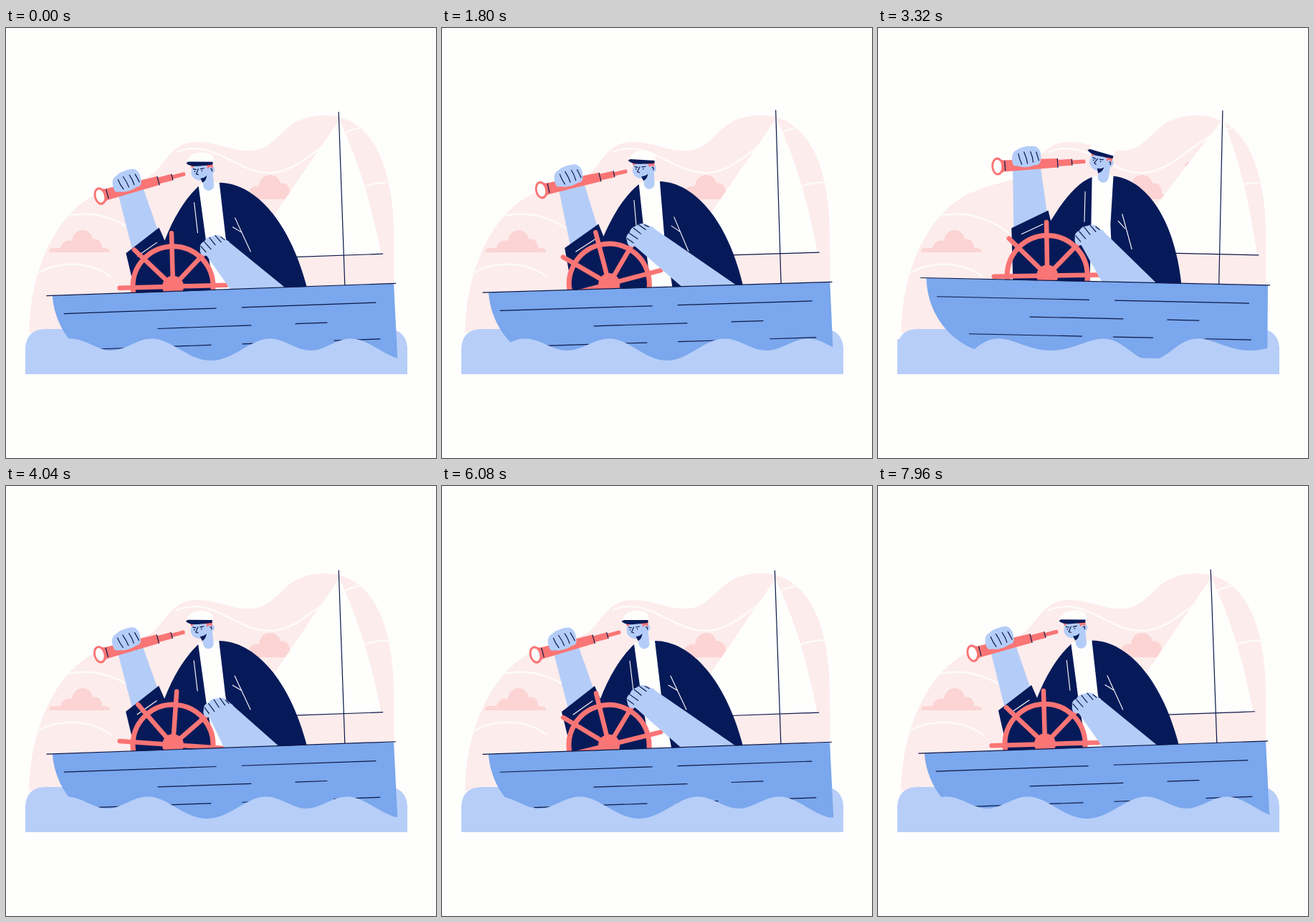
Animation, 600 px wide and 600 px high, one loop 8000 ms. Source, as an HTML page:

```html
<!DOCTYPE html>
<html lang="en">
<head>
<meta charset="utf-8">
<title>Captain at the wheel</title>
<style>
  html, body { margin: 0; width: 100%; height: 100%; overflow: hidden; background: #fefefd; }
  svg { display: block; width: 100vw; height: 100vh; }
  .white { fill: #fefefd; }
  .navy { fill: #061a59; }
  .skin { fill: #b4cdf8; }
  .red { fill: #fa7575; }
  .sky { fill: #fdecec; }
  .cloud { fill: #fcd4d4; }
  .water { fill: #b7cef8; }
  .hull { fill: #7aa7ed; }
  .ink, .chalk, .wind { fill: none; stroke-linecap: round; stroke-linejoin: round; }
  .ink { stroke: #0b1747; stroke-width: 1.2; }
  .chalk { stroke: #fefefd; stroke-width: 1.1; }
  .wind { stroke: #fefafa; stroke-width: 2.6; }
  .rim { fill: none; stroke: #fa7575; stroke-width: 7; stroke-linecap: round; }
</style>
</head>
<body>
<svg viewBox="0 0 600 600">
  <path class="sky" d="M32 425C34 330 75 250 135 228C165 214 190 216 208 201C226 184 232 159 268 159C302 160 320 176 350 170C385 162 387 122 445 122C515 122 541 200 541 290L542 425Z"/>
  <g class="wind">
    <path d="M41 344C70 325 115 324 146 347"/>
    <path d="M87 262C125 253 168 268 196 300"/>
    <path d="M238 173C290 152 322 205 372 202C418 198 440 152 494 139"/>
    <path d="M496 222Q518 215 539 215"/>
  </g>
  <g class="cloud">
    <path d="M60 313Q60 307 66 307H76C78 299 85 295 92 297C95 277 118 278 121 295C129 293 134 299 134 307H139Q145 308 145 313Z"/>
    <path d="M326 239Q327 232 334 232H338C339 223 346 219 353 221C355 200 380 201 383 217C391 215 396 221 396 231Q402 233 402 239Z"/>
    <path d="M428 193Q429 187 436 186C440 178 446 176 450 177C456 164 472 168 473 180C480 178 485 182 486 187Q490 188 490 193Z"/>
  </g>
  <path class="water" d="M27 483V446Q29 421 54 420H533Q558 421 560 446V483Z"/>

  <g class="boat">
    <path class="white" d="M474 131Q432 187 392 242L335 318H527Q510 210 476 131Z"/>
    <path class="ink" d="M474.7 118V360M405 318H529"/>
  </g>

  <path id="forearm" class="skin"/>
  <path id="shirt" class="white"/>
  <path id="coatL" class="navy"/>
  <path id="coatR" class="navy"/>
  <path id="seams" class="chalk"/>

  <g id="head">
    <path class="skin" d="M-13-8L-14 3C-13 10-6 14 2 13L3 20C4 29 17 30 18 20L15-8Z"/>
    <ellipse class="skin" cx="15" cy="-2" rx="4" ry="5"/>
    <path class="red" d="M-15-8H-8L-13-4ZM-2-9L16-10V-4L12-6L9-3L8-7Z"/>
    <path class="white" d="M-20-11C-19-24-4-27 4-26C15-25 19-20 16-11Z"/>
    <path class="navy" d="M-21-11L-18-13L16-13V-9L-4-7Q-16-6-21-11Z"/>
    <path class="navy" d="M-1 10Q4 10 8 6Q7 14 2 16Z"/>
    <path class="ink" d="M-11-3L-7-2M-1-3L4-4M-9 0V1M1-1V0M-4-3L-7 4L-4 5M13-3Q16-4 15 0"/>
  </g>

  <g id="scope">
    <path class="red" d="M0-11L9-8L84-6.5V6L9 8L0 11ZM84-4.5H104V4.5H84ZM104-2.7H122Q124 0 122 2.7H104Z"/>
    <ellipse class="red" rx="8.5" ry="12.5"/>
    <ellipse class="white" rx="5.6" ry="9.3"/>
    <path class="ink" d="M10.5-7V6M84-6V6M104-4V4"/>
    <path class="skin" d="M21-5C20-14 23-21 30-22C34-26 52-27 56-24C61-20 62-14 61-9C61-2 58 2 52 1C45 4 34 4 28 1C23 1 21-1 21-5Z"/>
    <path class="ink" d="M30-16Q31-8 34-1M38-18Q41-10 42-2M47-18Q50-10 50-3M55-17Q57-10 58-5"/>
  </g>

  <g class="boat">
    <g id="wheel">
      <circle class="rim" r="56"/>
      <g id="spokes"></g>
      <circle class="red" r="15"/>
    </g>
  </g>

  <path id="arm" class="skin"/>
  <g id="hand">
    <path class="skin" d="M290 325L280 318C272 319 270 313 271 308C270 303 273 299 277 298C279 293 284 291 288 291C293 288 300 289 303 293L311 298L314 310Z"/>
    <path class="ink" d="M272 305L279 313M277 299L286 309M284 293L292 303M292 290L300 299M300 292L305 296"/>
  </g>

  <g class="boat">
    <path class="hull" d="M66.5 360C68 410 105 462 172 465H544.5L543 360Z"/>
    <path class="ink" d="M58.5 359.7H545.7M82 385.5H294M330 385.5H517M212 411H342M404 411H448M128 436.5H285M329 436.5H384M457 436.5H521"/>
  </g>
  <path id="wave" class="water"/>
</svg>

<script>
const LOOP = 8000;
const HUB = [235, 353];
const PIVOT = [302, 410];
const DECK = 359.7;
const SWELL = 278;

// Each shape of the sailor: leaning back, leaning forward.
const POSES = {
  forearm: ["M153 222L187 214L214 290L178 318Z",
            "M193 182L231 180L240 260L191 282Z"],
  shirt: ["M268 219L298 215L307 300L335 385L285 385L275 290Z",
          "M303 205L334 204L328 290L335 385L285 385L299 280Z"],
  coatL: ["M268 221C248 240 232 268 221 297L213 279L167 315L184 385L294 385L279 300Z",
          "M303 206C278 214 258 244 244 265L241 251L189 274L190 385L295 385L300 275Z"],
  coatR: ["M297 216C345 216 398 268 423 375L322 375L306 292Z",
          "M333 205C385 212 422 280 425 375L330 375L327 272Z"],
  seams: ["M183 319L210 300M262 244L267 286M319 265L341 312M316 278L328 285",
          "M203 283L233 270M293 226L291 268M344 259L356 308M338 268L347 279"]
};

// Wheel angle relative to the boat: time, degrees.
const TURNS = [[0, .5], [1040, -15], [2560, -11], [4040, 6],
               [5240, -12], [6960, -12], [8000, .5]];

const $ = id => document.getElementById(id);
const boats = document.querySelectorAll(".boat");
const lerp = (a, b, k) => a + (b - a) * k;
const cycle = ms => Math.cos(Math.PI * ms / 1000);

$("spokes").innerHTML = Array.from({ length: 8 }, (_, i) =>
  `<path class="rim" style="stroke-width:6.5" d="M0 0V-74.5" transform="rotate(${i * 45})"/>`).join("");

function mixPath([a, b], k) {
  const ends = b.match(/[\d.]+/g);
  let i = 0;
  return a.replace(/[\d.]+/g, v => lerp(+v, +ends[i++], k).toFixed(2));
}

function turn([x, y], [cx, cy], deg) {
  const r = deg * Math.PI / 180, c = Math.cos(r), s = Math.sin(r);
  const dx = x - cx, dy = y - cy;
  return [cx + dx * c - dy * s, cy + dx * s + dy * c];
}

function wheelAngle(t) {
  const i = TURNS.findIndex(key => key[0] > t);
  const [t0, a] = TURNS[i - 1], [t1, b] = TURNS[i];
  return lerp(a, b, (1 - Math.cos(Math.PI * (t - t0) / (t1 - t0))) / 2);
}

// The deep trough narrows and widens as the swell rolls left.
function wavePath(t) {
  const trough = 286 - SWELL * t / 2000;
  const pinch = .1 - .25 * cycle(t);
  let d = "M27 483";
  for (let x = 27; x <= 560; x += 4.1) {
    const u = 2 * Math.PI * (x - trough) / SWELL;
    const w = u + pinch * Math.sin(u);
    const y = 445.5 + 7 * Math.cos(w) + 11.5 * Math.cos(2 * w);
    d += `L${x.toFixed(1)} ${y.toFixed(2)}`;
  }
  return d + "L560 445V483Z";
}

function draw(t) {
  const tilt = -2.05 * (cycle(t) - .04 * cycle(3 * t)) / .96;
  const bob = 6.5 * cycle(t - 200);
  const lean = (1 - cycle(t - 90)) / 2;
  const set = (el, value) => el.setAttribute("transform", value);
  const onBoat = p => {
    const [x, y] = turn(p, PIVOT, tilt);
    return [x, y + bob];
  };

  boats.forEach(g => set(g, `translate(0 ${bob}) rotate(${tilt} ${PIVOT})`));
  for (const id in POSES) $(id).setAttribute("d", mixPath(POSES[id], lean));
  set($("head"), `translate(${lerp(271.5, 315, lean)} ${lerp(200, 184.5, lean)}) rotate(${lerp(0, 18.5, lean)})`);
  set($("scope"), `translate(${lerp(130.5, 172, lean)} ${lerp(235.5, 187, lean)}) rotate(${lerp(-15, -1.5, lean)})`);

  // The near hand holds the rim and turns with it.
  const spin = wheelAngle(t);
  const grip = spin + tilt + 1.5;
  const hub = onBoat(HUB);
  set($("wheel"), `translate(${HUB}) rotate(${spin})`);
  set($("hand"), `translate(${hub}) rotate(${grip}) translate(-233 -361)`);

  const held = p => turn([p[0] - 233 + hub[0], p[1] - 361 + hub[1]], hub, grip);
  const top = held([309, 297]), low = held([280, 318]);
  const elbow = 389 - 1.6 * grip;
  const reach = (p, x) => [lerp(p[0], x, 1.2), lerp(p[1], onBoat([x, DECK])[1], 1.2)];
  const corners = [top, reach(top, elbow), reach(low, elbow - 76), low];
  $("arm").setAttribute("d", "M" + corners.map(p => p.join(" ")).join("L") + "Z");

  $("wave").setAttribute("d", wavePath(t));
}

const start = performance.now();
function tick() {
  draw((performance.now() - start) % LOOP);
  requestAnimationFrame(tick);
}
tick();
</script>
</body>
</html>
```
